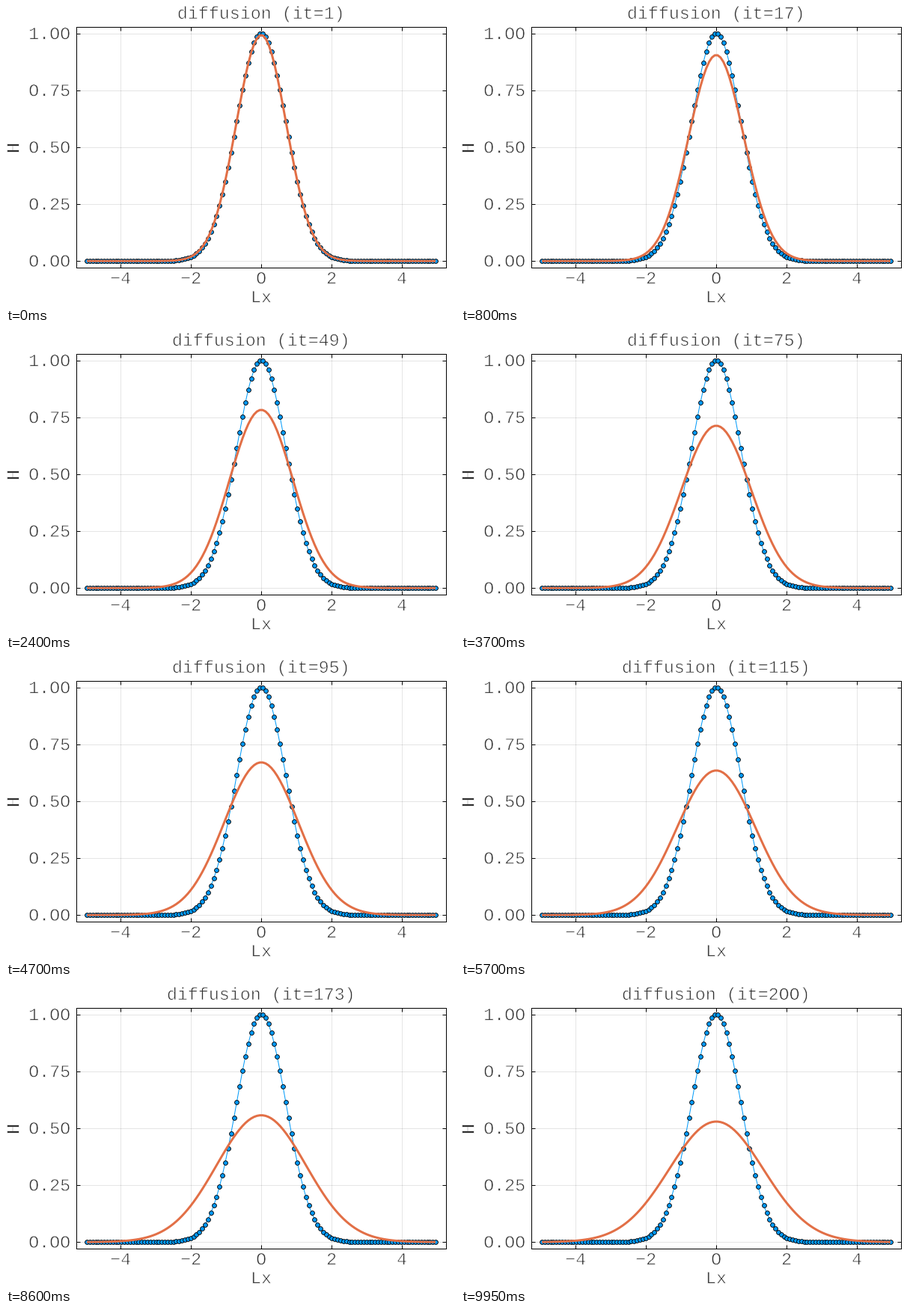
These frames come from a looping animation (600x400 px, 10000 ms). A matplotlib script:

```python
import numpy as np
import matplotlib.pyplot as plt
from matplotlib.animation import FuncAnimation
from matplotlib.patheffects import Stroke

W, H, DPI = 600, 400, 100
PX = 72 / DPI  # points per pixel
STEPS, INTERVAL = 200, 50
BLUE, ORANGE, INK = "#009afa", "#e26f46", "#303030"

plt.rcParams.update({
    "font.family": "Liberation Mono",
    "font.size": 23.3 * PX,
    "text.hinting": "none",
    "text.color": INK,
})

# Explicit diffusion of a Gaussian on a cell-centred grid
LENGTH, CELLS = 10.0, 122
dx = LENGTH / CELLS
x = (np.arange(CELLS) + 0.5) * dx - LENGTH / 2
start = np.exp(-x**2)


def diffuse():
    h = start.copy()
    states = []
    for _ in range(STEPS):
        h[1:-1] += np.diff(h, 2) / 2.1
        states.append(h.copy())
    return states


states = diffuse()


def widen(low, high):
    pad = 0.03 * (high - low)
    return low - pad, high + pad


fig = plt.figure(figsize=(W / DPI, H / DPI), dpi=DPI, facecolor="white")
left, right, top, bottom = 94.1, 588.1, 28.3, 350.3
ax = fig.add_axes([left / W, 1 - bottom / H,
                   (right - left) / W, (bottom - top) / H])
ax.set_xlim(*widen(x[0], x[-1]))
ax.set_ylim(*widen(0, start.max()))
xticks = [-4, -2, 0, 2, 4]
yticks = [0, 0.25, 0.5, 0.75, 1]
ax.set_xticks(xticks)
ax.set_yticks(yticks)
ax.set_axisbelow(True)
ax.grid(color="black", alpha=0.1, linewidth=PX)
ax.tick_params(direction="in", length=5 * PX, width=PX, top=True, right=True,
               labelbottom=False, labelleft=False)
for spine in ax.spines.values():
    spine.set_linewidth(PX)

# A white outline trims the glyphs to a light weight
thin = [Stroke(linewidth=0.7 * PX, foreground="white")]


def plain(text):
    # The capital O stands in for the font's dotted zero
    return text.replace("0", "O")


def label(px, py, text, **style):
    style = {"ha": "center", "va": "baseline", **style}
    return fig.text(px / W, 1 - py / H, plain(text), path_effects=thin, **style)


def to_pixels(px, py):
    u, v = ax.transData.transform((px, py))
    return u, H - v


for t in xticks:
    label(to_pixels(t, 0)[0], 371.5, str(t).replace("-", "\u2212"))
for t in yticks:
    label(86, to_pixels(0, t)[1] + 7.5, f"{t:.2f}", ha="right")
label(341, 396.5, "Lx")
label(16.5, 189.5, "H", rotation=90, rotation_mode="anchor")
title = label(340.5, 17, "")

ax.plot(x, start, color=BLUE, linewidth=PX, marker="o", markersize=5.8 * PX,
        markeredgecolor="black", markeredgewidth=0.9 * PX)
curve, = ax.plot(x, states[0], color=ORANGE, linewidth=3 * PX,
                 solid_joinstyle="round", solid_capstyle="butt")


def draw(i):
    curve.set_ydata(states[i])
    title.set_text(plain(f"diffusion (it={i + 1})"))
    return curve, title


anim = FuncAnimation(fig, draw, frames=STEPS, interval=INTERVAL,
                     repeat=True, repeat_delay=0)
plt.show()
```
